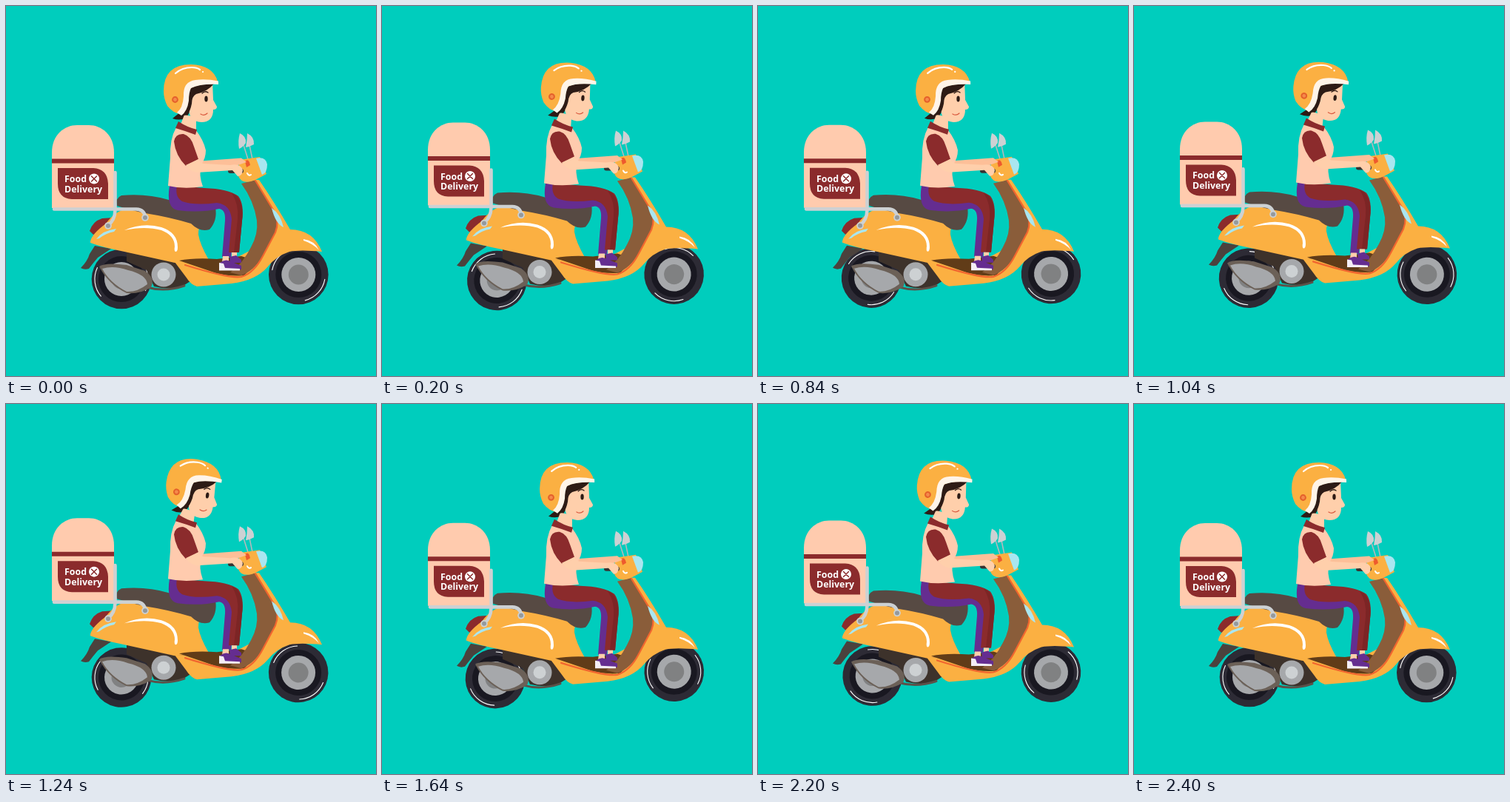
Recreate the animation shown at these times as an HTML page. Size 500x500 px, loop 2.44 s.

```html
<!DOCTYPE html>
<html lang="en">
<head>
<meta charset="utf-8">
<title>Food delivery scooter</title>
<style>
  html, body { margin: 0; width: 100%; height: 100%; overflow: hidden; background: #00cdbd; }
  svg { display: block; width: 100vw; height: 100vh; }
  text { font: 700 12.4px "Open Sans", "Noto Sans", sans-serif; fill: #fff; }
  .yellow { fill: #fbb042; }
  .maroon { fill: #8b2b2c; }
  .peach { fill: #ffcbae; }
  .skin { fill: #ffcfab; }
  .purple { fill: #652d90; }
  .seat { fill: #574a43; }
  .silver { fill: #cdd1d3; }
  .grey { fill: #a6a8ab; }
  .glass { fill: #a9e6f0; }
  .white { fill: #fff; }
  .hair { fill: #2d1b15; }
  .line { fill: none; stroke-linecap: round; stroke-linejoin: round; }
</style>
</head>
<body>
<svg viewBox="0 0 500 500">
  <defs>
    <g id="wheel">
      <circle r="40.3" fill="#2d2b35"/>
      <circle r="31" fill="#191821"/>
      <circle r="23" class="grey"/>
      <circle r="13.5" fill="#808182"/>
    </g>
    <path id="glint" class="line" d="M35.500 6.300A36 36 0 0 1 9 34.900M-35.500 -6.300A36 36 0 0 1 -9 -34.900" stroke="#fff" stroke-width="1.1"/>
  </defs>

  <g id="rear"><use href="#wheel"/><use href="#glint" transform="rotate(130)"/></g>
  <g id="front"><use href="#wheel"/><use href="#glint"/></g>

  <g id="scooter">
    <!-- engine and exhaust -->
    <path fill="#4b423d" d="M101 354Q110 345 113 335L120 324L142 328L124 340Q118 347 112 355Q106 357 101 354Z"/>
    <path fill="#3d322b" d="M163 331L240 345L249 372L238 379Q222 384 200 379L190 357L163 345Z"/>
    <path class="line" d="M190 380Q215 387 241 378" stroke="#5c5149" stroke-width="3"/>
    <path fill="#6b6057" d="M126 352Q134 346 163 350L188 358Q202 368 196 380Q180 390 163 388Q138 376 126 352Z"/>
    <path class="grey" d="M130 355Q145 350 165 357Q190 363 191 376Q177 387 163 386Q140 374 130 355Z"/>
    <circle cx="213" cy="363" r="16.500" class="grey"/>
    <circle cx="213" cy="363" r="8.500" class="silver"/>

    <!-- bodywork -->
    <path class="maroon" d="M113 304Q117 291 130 287L146 286L134 301L118 309Z"/>
    <path class="yellow" d="M114 318Q116 308 135 294Q148 276 165 274L268 285Q259 300 260 309Q262 322 274 343L228 347L160 332Q130 326 114 320Z"/>
    <path class="yellow" d="M332 235L342 235Q362 264 384 302Q415 302 427 332Q397 329 383 332Q365 338 354 352Q338 371 305 375L258 379Q250 377 243 366L228 346L300 346L350 320Z"/>
    <path fill="#613c18" d="M234 344Q254 340 285 342L318 338L340 345L322 364Q304 366 284 361Z"/>
    <path fill="#8a5d3a" d="M318 240L337 235Q350 257 362 277Q370 292 364 306L347 338Q335 358 318 364L303 360Q320 348 331 326Q341 308 339 290Q335 263 318 240Z"/>
    <path class="line" d="M337 236Q350 257 362 277Q370 291 364 306L347 338Q335 361 318 366Q303 369 242 350" stroke="#f1662f" stroke-width="2.200"/>
    <path class="white" d="M160 303Q185 292 210 299Q232 306 232 326Q232 332 229 332Q227 331 228 325Q228 310 210 303Q188 297 160 303Z"/>
    <path class="glass" d="M122 315Q131 303 149 301L146 305Q135 307 126 314Z"/>
    <path class="glass" d="M359 273Q371 281 375 299Q364 294 359 273Z"/>
    <path class="white" d="M402 315Q417 317 423 330Q415 321 402 317Z"/>
    <path class="seat" d="M150 270Q147 260 156 256Q190 253 220 262L283 272Q286 290 275 302Q262 306 250 294Q220 285 188 280Q165 275 150 270Z"/>

    <!-- delivery box -->
    <path class="peach" d="M62 273V198C62 174 79 161 96 161H112C129 161 146 174 146 198V273Z"/>
    <path class="maroon" d="M62 206.500h84v6h-84zM70 219H118Q137 220 138 240V261H89Q70 260 70 240Z"/>
    <text x="79" y="238">Food</text>
    <text x="79" y="251.500">Delivery</text>
    <circle cx="119" cy="233.500" r="7" class="white"/>
    <path class="line" d="M115.500 230l7 7m0 -7l-7 7" stroke="#8b2b2c" stroke-width="1.500"/>
    <path class="line" d="M65 274.500H176Q187 275 188 285M147.500 225V276Q147 290 138 296" stroke="#cdd1d3" stroke-width="4.600"/>
    <g class="silver"><circle cx="138" cy="297" r="4.800"/><circle cx="188" cy="286" r="4.800"/></g>
    <g fill="#94999d"><circle cx="138" cy="297" r="3"/><circle cx="188" cy="286" r="3"/></g>

    <!-- handlebar -->
    <path class="line" d="M327 207L321 188M333 207L329 188" stroke="#b4b9bc" stroke-width="1.600"/>
    <path class="silver" d="M316 172Q325 176 324 185Q321 190 315 193Q313 182 316 172ZM326 172Q336 177 335 187Q330 190 324 191Q326 181 326 172Z"/>
    <path class="yellow" d="M315 208L343 204L352 227L337 235L331 237Q318 240 314 230Z"/>
    <path class="glass" d="M338 206Q351 203 353 214Q353 226 346 228Z"/>
    <path fill="#ee5a2d" d="M323 210Q328 205 330 215L325 218Z"/>
    <path class="line" d="M326 226q2 4 5 2" stroke="#fff" stroke-width="2"/>

    <!-- legs -->
    <path class="purple" d="M221 243Q216 273 232 276Q262 280 288 274Q297 275 296 290L292 339H304L312 265L240 243Z"/>
    <path class="maroon" d="M231 243L268 246Q300 247 314 257Q322 268 319 290L315 333H301L305 288Q303 268 285 266Q255 270 238 264Q228 258 231 243Z"/>
    <path fill="#7c2525" d="M311 256Q322 268 319 290L315 333H308L313 288Q315 268 305 253Z"/>
    <path class="skin" d="M293 338h8v8h-9zM305 333h7v6h-7z"/>
    <path class="purple" d="M302 339L311 337L318 343V347H303ZM289 347Q296 341 303 345L318 351V356L289 357Z"/>
    <path fill="#f4eef5" d="M288 347L294 348L296 354L316 355V357.500H288Z"/>

    <!-- torso and arms -->
    <path fill="#fdbf98" d="M256 210L318 205.500L325 211L305 218L258 220Z"/>
    <path class="peach" d="M230 164Q221 180 222 205L219 243Q240 248 266 244Q260 228 264 214Q270 206 270 195Q267 181 256 167Z"/>
    <path class="maroon" d="M227 183Q229 172 240 173Q250 176 254 190L260 207L243 216Q229 202 227 183Z"/>
    <path class="line" d="M303 223H318" stroke="#383332" stroke-width="6"/>
    <path class="skin" d="M243 215L260 207Q262 212 267 213L303 215Q317 212 320 222Q319 230 313 230L306 222L258 225Q248 223 243 215Z"/>

    <g id="head">
      <path class="hair" d="M225 152L236 143L250 140L243 152Q233 155 225 152Z"/>
      <path class="skin" d="M241 147L257 150L257 169L236 160Z"/>
      <path class="skin" d="M250 104L279 103L280 127L285 136Q285 140 280 140Q280 157 264 157Q247 156 247 138Z"/>
      <path class="hair" d="M244 112L258 104L281 105Q272 116 257 119Q251 122 251 132Q249 142 245 147L236 149Z"/>
      <path class="yellow" d="M213 115Q213 79 250 79Q280 80 286 102L287 105Q250 104 243 118Q242 136 236 146Q226 145 218 135Q213 125 213 115Z"/>
      <path fill="#fff4e8" d="M287 101.500V106Q262 105 250 111Q247 117 247 128Q245 142 237 148L231 144Q239 138 240 122Q239 102 256 100Q270 98 287 101.500Z"/>
      <path class="line" d="M229 91Q238 83 251 83Q258 83 262 86M266 89h.1" stroke="#fff" stroke-width="2.200"/>
      <circle cx="228.500" cy="126.500" r="3.400" fill="#f58a4b" stroke="#e4602b" stroke-width="2"/>
      <ellipse cx="270.500" cy="125.500" rx="2.200" ry="4" class="hair"/>
      <path class="line" d="M265 118Q269 114 273 117" stroke="#2d1b15" stroke-width="1.300"/>
      <path class="line" d="M263 146Q268 149 272 145" stroke="#d9583e" stroke-width="1.200"/>
    </g>
    <path class="maroon" d="M233 156Q245 164 258 167L256 174Q243 169 229 165Z"/>
  </g>
</svg>
<script>
  const LOOP = 2440, STEP = 40, BOB = 800, SPIN = 1200;
  const place = (id, transform) => document.getElementById(id).setAttribute("transform", transform);

  // Each wheel turns around a point slightly off its centre.
  function turn(id, x, y, wobble, phase, degrees) {
    const a = (degrees + phase) * Math.PI / 180;
    place(id, `translate(${x + wobble * Math.cos(a)} ${y + wobble * Math.sin(a)}) rotate(${degrees})`);
  }

  function draw(now) {
    const t = Math.floor(now % LOOP / STEP) * STEP;
    const lift = (1 - Math.cos(t / BOB * 2 * Math.PI)) / 2;
    const degrees = t / SPIN * 360;
    place("scooter", `translate(0 ${-7 * lift})`);
    place("head", `rotate(${8 * lift} 236 140)`);
    turn("rear", 154, 369.4, 2, -10, degrees);
    turn("front", 395.3, 362.2, 0.8, 90, degrees);
    requestAnimationFrame(draw);
  }
  requestAnimationFrame(draw);
</script>
</body>
</html>
```
